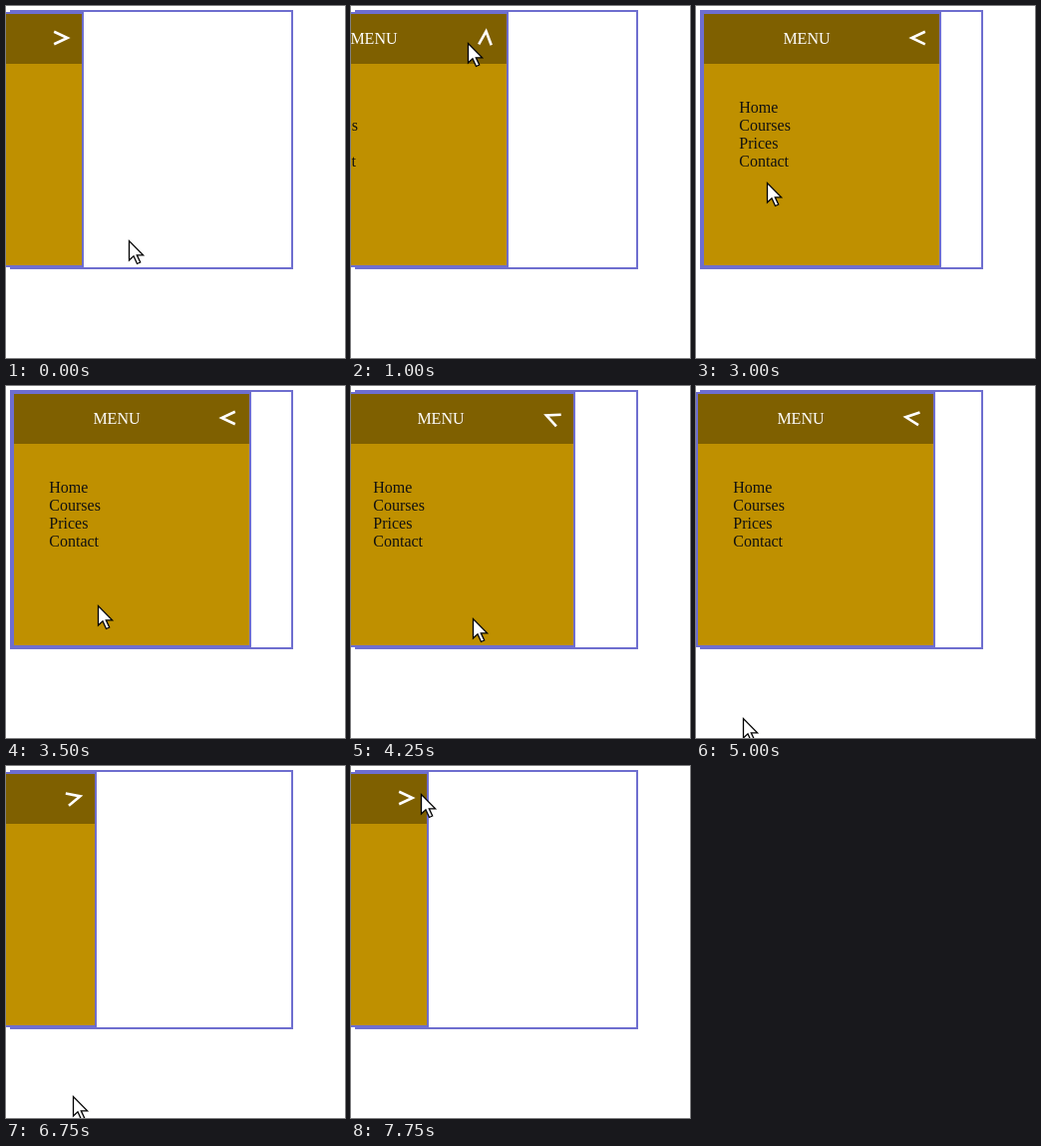
Recreate the animation shown at these times as an HTML page. Size 340 by 353 pixels, loop 8000 ms.

```html
<!DOCTYPE html>
<html lang="en">
<head>
<meta charset="utf-8">
<title>Sliding menu</title>
<style>
  html, body { margin: 0; width: 100%; height: 100%; overflow: hidden; background: #fff; }
  #stage { position: relative; width: 340px; height: 353px; overflow: hidden; background: #fff; }
  #stage div, svg { position: absolute; box-sizing: border-box; }
  #frame { left: 4px; top: 4px; width: 284px; height: 260px; border: 2px solid #6e6ecf; }
  #panel {
    left: 6px; top: 6px; width: 240px; height: 256px;
    border: 2px solid #6e6ecf; background: #bf9000;
    font: 16px/18px "Liberation Serif", "Times New Roman", serif; color: #111;
  }
  #head { left: 0; top: 0; width: 236px; height: 50px; background: #7f6000; color: #fff; }
  #title { left: 79.4px; top: 16px; }
  #list { left: 35.3px; top: 85px; white-space: pre; }
  #arrow { left: 204.5px; top: 14.4px; }
  #cursor { left: 0; top: 0; overflow: visible; }
</style>
</head>
<body>
<div id="stage">
  <div id="frame"></div>
  <div id="panel">
    <div id="head">
      <div id="title">MENU</div>
      <svg id="arrow" width="20" height="20" viewBox="-10 -10 20 20">
        <path d="M-6.8-6.3 6.6 0-6.8 6.3" fill="none" stroke="#fff" stroke-width="2.6"/>
      </svg>
    </div>
    <div id="list">Home
Courses
Prices
Contact</div>
  </div>
  <svg id="cursor" width="16" height="25">
    <path d="M.5.5V20L5 15.8 8.5 23.5 11.7 22 8.3 14.8H14.6Z" fill="#fff" stroke="#000" stroke-width="1.3"/>
  </svg>
</div>
<script>
const LOOP = 8000, STEP = 250, TRAVEL = 168;

// start, duration, openness from, openness to
const slides = [
  [185, 2900, 0, 1],
  [3905, 2900, 1, 0],
  [4250, 360, 0.875, 1],
  [4842, 2900, 1, 0]
];

// time, x, y of the pointer tip
const route = [
  [0, 123, 235], [250, 74, 125], [500, 62, 42], [750, 86, 34], [1000, 117, 37],
  [1500, 120, 62], [2250, 84, 128], [3000, 71, 177], [3500, 92, 220],
  [3750, 112, 266], [4000, 124, 262], [4250, 122, 233], [4500, 98, 228],
  [4750, 62, 262], [5000, 47, 333], [6250, 47, 333], [6750, 67, 331],
  [7000, 88, 270], [7500, 92, 100], [7750, 70, 28], [8000, 70, 28]
];

const panel = document.getElementById("panel");
const arrow = document.getElementById("arrow");
const cursor = document.getElementById("cursor");

// cubic-bezier(.25, .1, .25, 1)
function ease(x) {
  if (x <= 0) return 0;
  if (x >= 1) return 1;
  let lo = 0, hi = 1, s;
  for (let i = 0; i < 24; i++) {
    s = (lo + hi) / 2;
    if (0.75 * s * (1 - s) + s ** 3 < x) lo = s; else hi = s;
  }
  return 0.3 * s * (1 - s) ** 2 + 3 * s * s * (1 - s) + s ** 3;
}

function openness(t) {
  const [start, dur, a, b] = slides.findLast(s => s[0] <= t) || slides[0];
  return a + (b - a) * ease((t - start) / dur);
}

function pointer(t) {
  const i = route.findIndex(p => p[0] > t);
  const [t0, x0, y0] = route[i - 1], [t1, x1, y1] = route[i];
  const k = (t - t0) / (t1 - t0);
  return [x0 + (x1 - x0) * k, y0 + (y1 - y0) * k].map(Math.round);
}

function draw(t) {
  const p = openness(t), [x, y] = pointer(t);
  panel.style.transform = `translateX(${Math.round((p - 1) * TRAVEL)}px)`;
  arrow.style.transform = `rotate(${-180 * p}deg)`;
  cursor.style.transform = `translate(${x}px, ${y}px)`;
}

const begin = performance.now();
function tick() {
  const t = (performance.now() - begin) % LOOP;
  draw(Math.floor(t / STEP) * STEP);
  requestAnimationFrame(tick);
}
tick();
</script>
</body>
</html>
```
